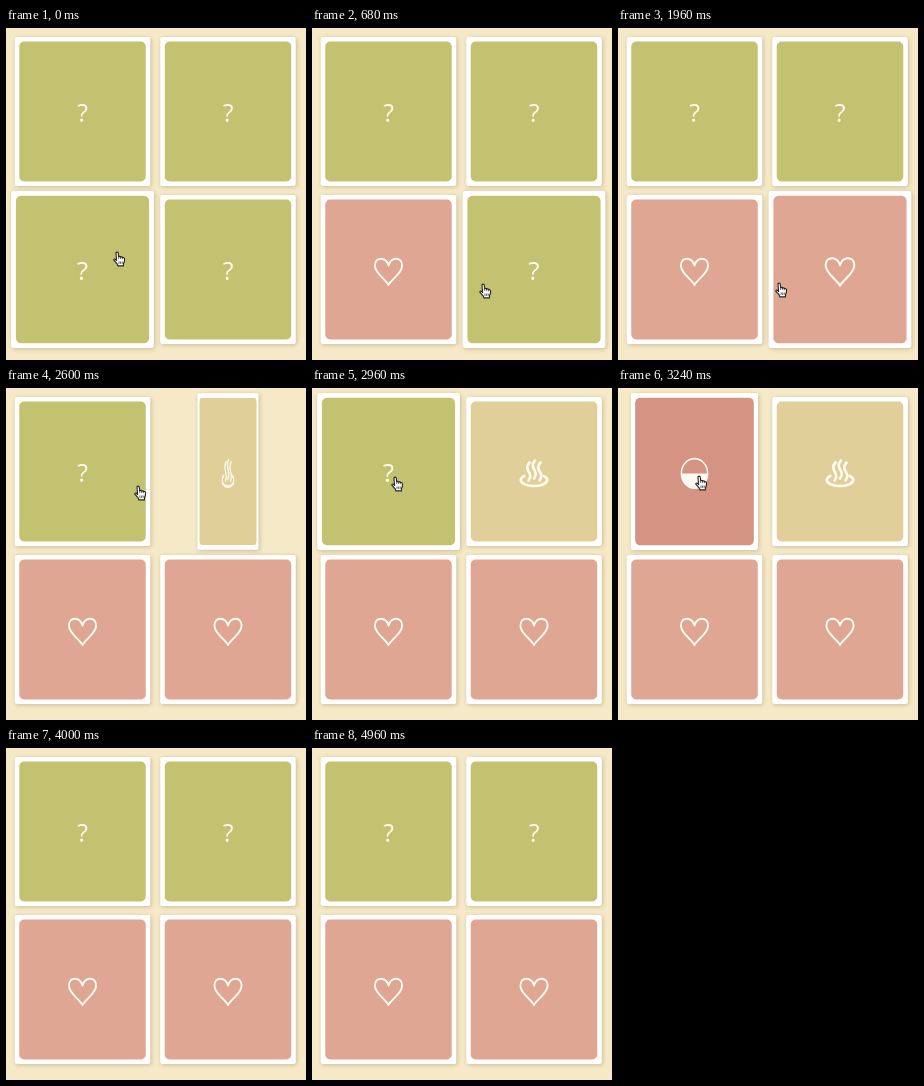
Animation, 300 px wide and 332 px high, one loop 5.32 s. Source, as an HTML page with a canvas:

```html
<!DOCTYPE html>
<html lang="en">
<head>
<meta charset="utf-8">
<title>Memory cards</title>
<style>
  html, body { margin: 0; width: 100%; height: 100%; overflow: hidden; background: #f5e9c7; }
  canvas { display: block; }
</style>
</head>
<body>
<canvas id="stage" width="300" height="332"></canvas>
<script>
const ctx = document.getElementById('stage').getContext('2d');
const LOOP = 5320, FLIP = 400, HOVER = 300;
const CARD_W = 135.5, CARD_H = 149, BORDER = 4.5;
const CREAM = '#fffaf0';

// Toggle times alternate on/off, starting from off.
const cards = [
  { x: 76.5, y: 83.5, color: '#d59383', icon: halfDisc, hover: [2600, 3540], flip: [3020, 3524] },
  { x: 222, y: 83.5, color: '#e0cf98', icon: hotSpring, hover: [2160, 2575], flip: [2452, 3524] },
  { x: 76.5, y: 241.5, color: '#dfa693', icon: heart, hover: [-HOVER, 270], flip: [40] },
  { x: 222, y: 241.5, color: '#dfa693', icon: heart, hover: [340, 2080, 3570, 3740], flip: [1040] }
];

// time, x, y of the pointer's centre
const pointerPath = [
  [0, 113, 231], [160, 113, 233], [440, 176, 262], [680, 173, 263], [920, 163, 264],
  [1920, 163, 264], [1960, 163, 262], [2300, 196, 112], [2440, 192, 108],
  [2600, 134, 105], [2840, 86, 96], [3240, 83, 95], [3460, 83, 96],
  [3640, 218, 295], [3780, 236, 350]
];

// Cubic Bézier easing equal to the CSS "ease" keyword.
function ease(x) {
  if (x <= 0) return 0;
  if (x >= 1) return 1;
  let lo = 0, hi = 1, u = 0.5;
  for (let i = 0; i < 20; i++) {
    u = (lo + hi) / 2;
    const bx = 0.75 * u * (1 - u) * (1 - u) + 0.75 * u * u * (1 - u) + u ** 3;
    if (bx < x) lo = u; else hi = u;
  }
  return 0.3 * u * (1 - u) * (1 - u) + 3 * u * u * (1 - u) + u ** 3;
}

function toggled(times, duration, t) {
  return times.reduce((level, start, i) => {
    const goal = i % 2 ? 0 : 1;
    return level + (goal - level) * ease((t - start) / duration);
  }, 0);
}

function rounded(x, y, w, h, r) {
  ctx.beginPath();
  ctx.roundRect(x, y, w, h, r);
  ctx.fill();
}

function question() {
  ctx.font = '500 25px "Open Sans", "Noto Sans", sans-serif';
  ctx.textAlign = 'center';
  ctx.textBaseline = 'alphabetic';
  ctx.fillText('?', 0, 10);
}

function heart() {
  ctx.lineWidth = 1.9;
  ctx.beginPath();
  ctx.moveTo(0, 15.5);
  ctx.bezierCurveTo(-2, 10.5, -13.6, 4, -13.6, -3.8);
  ctx.bezierCurveTo(-13.6, -13, -2.5, -13.2, 0, -4);
  ctx.bezierCurveTo(2.5, -13.2, 13.6, -13, 13.6, -3.8);
  ctx.bezierCurveTo(13.6, 4, 2, 10.5, 0, 15.5);
  ctx.stroke();
}

function hotSpring() {
  ctx.lineWidth = 2.7;
  ctx.beginPath();
  ctx.ellipse(0, 8.5, 13.2, 6, 0, -0.75, Math.PI + 0.75);
  ctx.stroke();
  for (const x of [-5.5, 0, 5.5]) {
    const top = x ? -9 : -11;
    ctx.beginPath();
    ctx.moveTo(x + 1, top);
    ctx.bezierCurveTo(x - 6, top + 8, x + 6, top + 10, x, top + 18);
    ctx.stroke();
  }
}

function halfDisc() {
  ctx.lineWidth = 1.6;
  ctx.beginPath();
  ctx.arc(0, 1.8, 14, 0, Math.PI * 2);
  ctx.stroke();
  ctx.beginPath();
  ctx.arc(0, 1.8, 14, 0, Math.PI);
  ctx.fill();
}

function drawCard(card, t) {
  const turn = toggled(card.flip, FLIP, t);
  const scale = 1 + 0.053 * toggled(card.hover, HOVER, t);
  const faceUp = turn > 0.5;
  ctx.save();
  ctx.translate(card.x, card.y);
  ctx.scale(scale * Math.max(0.005, Math.abs(Math.cos(turn * Math.PI))), scale);

  ctx.shadowColor = 'rgba(110, 85, 35, 0.3)';
  ctx.shadowBlur = 4;
  ctx.shadowOffsetX = ctx.shadowOffsetY = 1;
  ctx.fillStyle = '#fff';
  rounded(-CARD_W / 2, -CARD_H / 2, CARD_W, CARD_H, 2);
  ctx.shadowColor = 'transparent';

  ctx.fillStyle = faceUp ? card.color : '#c3c270';
  rounded(-CARD_W / 2 + BORDER, -CARD_H / 2 + BORDER, CARD_W - 2 * BORDER, CARD_H - 2 * BORDER, 5);

  ctx.fillStyle = ctx.strokeStyle = CREAM;
  ctx.lineCap = ctx.lineJoin = 'round';
  (faceUp ? card.icon : question)();
  ctx.restore();
}

function pointerAt(t) {
  const next = pointerPath.findIndex(key => key[0] > t);
  if (next < 0) return null;
  const [t0, x0, y0] = pointerPath[next - 1];
  const [t1, x1, y1] = pointerPath[next];
  const k = (t - t0) / (t1 - t0);
  return [x0 + (x1 - x0) * k, y0 + (y1 - y0) * k];
}

function drawPointer(t) {
  const at = pointerAt(t);
  if (!at) return;
  ctx.save();
  ctx.translate(Math.round(at[0]) - 6, Math.round(at[1]) - 7.5);
  const hand = new Path2D(
    'M3 1.8 Q3 .6 4.1 .6 Q5.2 .6 5.3 1.8 L5.7 5.2 Q7 4.5 7.7 5.6 Q9 5 9.7 6.1 ' +
    'Q11.5 5.8 11.6 7.7 Q11.7 10.2 10.5 12 L10.4 14.4 H4.8 L4.4 12.7 L.8 8.6 Q.8 7.2 2.3 7.7 L3.6 9 Z');
  ctx.fillStyle = '#fff';
  ctx.strokeStyle = '#222';
  ctx.lineWidth = 1.1;
  ctx.lineJoin = 'round';
  ctx.fill(hand);
  ctx.stroke(hand);
  ctx.lineWidth = 0.7;
  ctx.stroke(new Path2D('M5.7 5.2V7.4M7.7 5.6V7.6M9.7 6.1V7.8M6 10V12.4M7.6 10V12.4M9.2 10V12.4'));
  ctx.restore();
}

function render(t) {
  ctx.fillStyle = '#f5e9c7';
  ctx.fillRect(0, 0, 300, 332);
  cards.forEach(card => drawCard(card, t));
  drawPointer(t);
}

const start = performance.now();
function tick() {
  render((performance.now() - start) % LOOP);
  requestAnimationFrame(tick);
}
tick();
</script>
</body>
</html>
```
